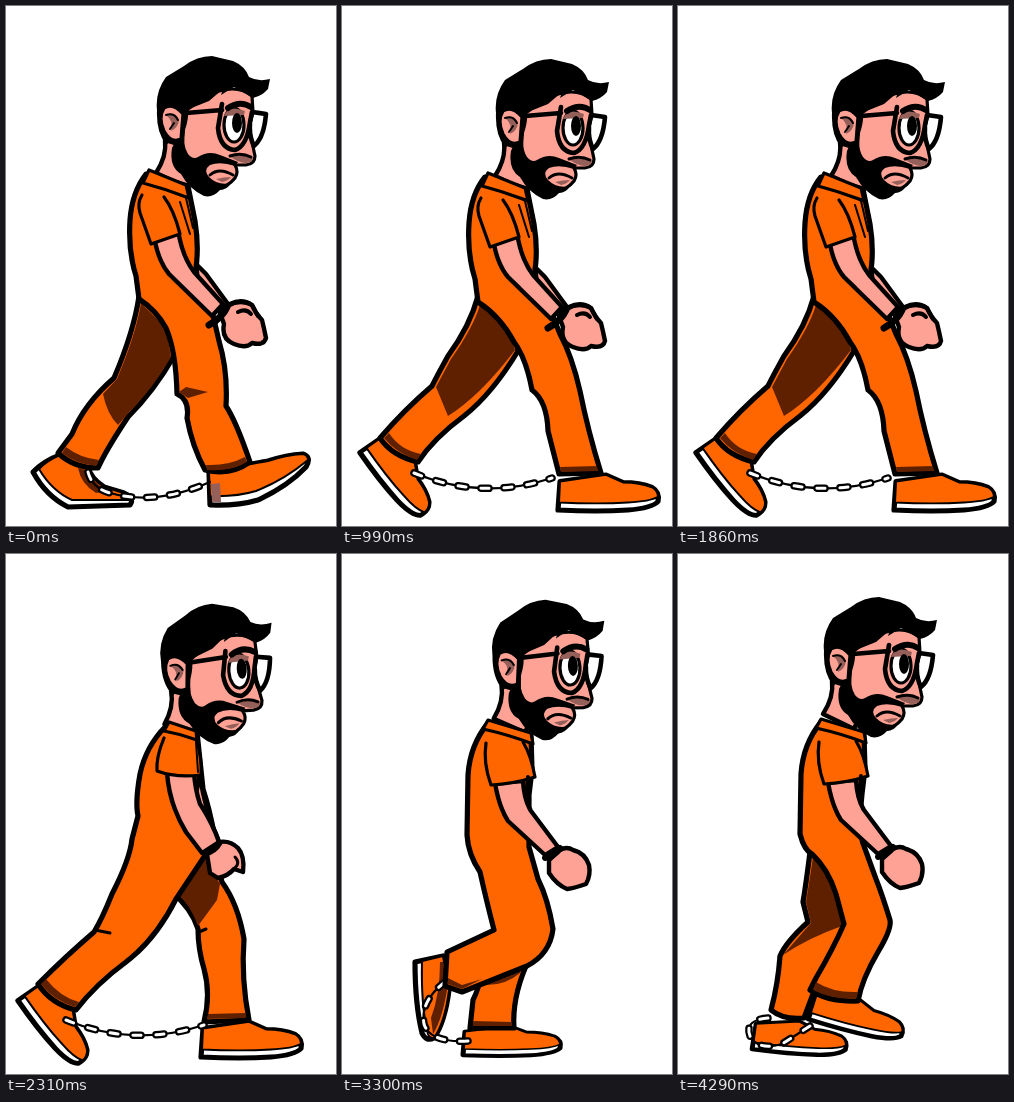
An HTML page without scripts for the animation above (4320 ms loop, 330 by 520 pixels).

```html
<!DOCTYPE html>
<html lang="en">
<head>
<meta charset="utf-8">
<title>Walk cycle</title>
<style>
html, body { margin: 0; width: 100%; height: 100%; overflow: hidden; background: #fff; }
.stage { position: relative; width: 330px; height: 520px; overflow: hidden; }
.reel { position: absolute; left: 0; top: 0; animation: walk 4320ms step-end infinite; }
path, ellipse { stroke-linejoin: round; stroke-linecap: round; }
.o, .s, .w { stroke: #000; stroke-width: 5.2; }
.o { fill: #f60; }
.s { fill: #ffa296; stroke-width: 4.4; }
.w { fill: #fff; }
.d { fill: #5f2000; }
.g { fill: #96605a; }
.l { fill: none; stroke: #000; stroke-width: 3; }
.thin { stroke-width: 3.2; }
.fine { stroke-width: 2; }
.cuff { stroke-width: 7; }
.chain path { fill: none; stroke: #000; stroke-width: 2.2; }
.chain .ring { stroke-width: 7.5; stroke-dasharray: 8 15; }
.chain .hole { stroke: #fff; stroke-width: 3; stroke-dasharray: 8 15; }
/* eight poses every 870 ms, cut short at the end of the loop */
@keyframes walk {
  0%, 20.138%, 40.277%, 60.416%, 80.555% { transform: translateX(0); }
  2.777%, 22.916%, 43.055%, 63.194%, 83.333% { transform: translateX(-330px); }
  5.555%, 25.694%, 45.833%, 65.972%, 86.111% { transform: translateX(-660px); }
  8.333%, 28.472%, 48.611%, 68.749%, 88.888% { transform: translateX(-990px); }
  11.111%, 31.249%, 51.388%, 71.527%, 91.666% { transform: translateX(-1320px); }
  13.194%, 33.333%, 53.472%, 73.611%, 93.749% { transform: translateX(-1650px); }
  15.972%, 36.111%, 56.249%, 76.388%, 96.527% { transform: translateX(-1980px); }
  18.749%, 38.888%, 59.027%, 79.166%, 99.305% { transform: translateX(-2310px); }
}
</style>
</head>
<body>
<div class="stage">
<svg class="reel" width="2640" height="520" viewBox="0 0 2640 520">
<defs>
  <g id="head">
    <path class="s" d="M159 134Q161 150 150 167L181 182L186 170L178 140Z"/>
    <path class="s thin" d="M178 106L200 90Q230 76 246 90L247 106L243 122L249 150Q249 158 240 159L229 159Q233 166 229 172Q222 181 210 183L190 180L176 150Z"/>
    <path d="M160 138Q150 126 151 104Q149 86 160 71L178 60Q191 50 206 50L227 55Q239 60 243 71Q252 76 264 73L262 83Q256 90 247 92L228 81L215 89L217 83L203 95L183 103L178 116L160 140L156 152Z"/>
    <path d="M171 106L182 103Q183 112 179 124Q176 138 182 148Q187 154 192 151Q203 144 214 149L232 156L229 160Q214 155 204 159Q197 164 203 171Q212 180 225 177Q221 184 214 184Q207 192 198 190Q183 183 175 168Q163 161 166 142Q173 130 171 106Z"/>
    <path class="s thin" d="M177 108Q167 96 158 102Q152 112 158 125Q165 138 175 133Z"/>
    <path class="g" d="M160 109Q169 104 173 114Q172 122 165 125Q168 115 160 109Z"/>
    <path class="l fine" d="M160 109Q168 106 172 114M168 117L164 123"/>
    <path class="g" d="M225 151Q236 147 247 152Q247 157 239 157Q231 156 225 151Z"/>
    <path class="l" d="M224 150Q235 146 245 151M204 169Q213 161 227 169"/>
    <path class="g" d="M210 173Q218 171 225 171Q222 175 216 176Z"/>
    <ellipse class="w thin" cx="228" cy="119" rx="10" ry="17"/>
    <path class="g" d="M218 110Q222 98 239 105L238 109Z"/>
    <ellipse cx="231" cy="117" rx="5" ry="10"/>
    <path class="l cuff" d="M222 102Q234 94 245 101" style="stroke-width:6"/>
    <path class="l" d="M180 107L216 104M216 98L212 122Q214 143 229 144Q241 140 244 116L246 106M246 106L260 108Q258 132 248 140Q243 130 244 118" style="stroke-width:4.6"/>
  </g>

  <g id="arms0">
    <path class="s" d="M190 258L200 268L222 298L212 303L192 275Z"/>
    <path class="s" d="M148 230Q152 255 163 268L206 310L217 298L188 266Q176 250 172 224Z"/>
    <path class="s" d="M214 307L224 298Q236 292 246 299Q250 308 256 314Q258 322 260 332Q258 340 246 337Q240 343 228 338Q215 333 218 318Z"/>
    <path class="l cuff" d="M203 319Q216 312 221 301"/>
    <path class="l" d="M222 300Q234 293 246 299L252 310M232 306Q240 302 245 308" style="stroke-width:4"/>
    <path class="o thin" d="M136 189Q131 197 134 207L145 238L174 228Q168 204 158 191"/>
    <path class="l fine" d="M180 192L187 222M174 196L184 228"/>
    <path class="o thin" d="M143 164L180 179L183 192Q160 183 137 177Z"/>
  </g>
  <g id="arms1">
    <path class="s" d="M194 220Q198 255 212 285L204 290L190 240Z"/>
    <path class="s" d="M161 218Q163 250 180 278L196 299L213 288Q206 268 194 250Q189 235 188 218Z"/>
    <path class="s" d="M201 300L213 288Q224 286 232 294Q239 302 237 318L228 315Q222 322 212 324L204 319Z"/>
    <path class="l" d="M228 315Q235 309 229 303"/>
    <path class="l" d="M199 300Q209 298 214 289" style="stroke-width:5"/>
    <path class="o thin" d="M158 184Q150 203 151 217Q170 224 195 221Q196 205 191 188"/>
    <path class="l fine" d="M190 188L192 218"/>
    <path class="o thin" d="M163 168L190 177L191 186Q175 180 158 177Z"/>
  </g>
  <g id="arms2">
    <path class="s" d="M186 258L196 272L214 300L204 304L188 275Z"/>
    <path class="s" d="M151 228Q156 252 165 266L193 309L211 300L188 262Q182 248 180 226Z"/>
    <path class="s" d="M196 312L213 303Q221 297 225 303Q236 306 234 322Q234 334 218 333Q204 333 196 318Z"/>
    <path class="l" d="M194 310L211 303M213 303Q214 297 221 299" style="stroke-width:5"/>
    <path class="o thin" d="M142 190Q139 212 144 232Q165 235 183 228Q184 208 176 190"/>
    <path class="l fine" d="M185 190L189 230M181 196L185 228"/>
    <path class="o thin" d="M149 161L187 175L186 186Q165 178 143 172Z"/>
  </g>
  <g id="arms3">
    <path class="s" d="M150 228Q154 252 163 266L200 300L213 292L186 256Q179 245 178 226Z"/>
    <path class="s" d="M204 305L215 295Q222 291 228 295Q240 298 244 310Q246 320 241 329Q230 333 222 334Q212 330 204 318Z"/>
    <path class="l" d="M200 303Q210 301 215 293" style="stroke-width:6"/>
    <path class="o thin" d="M141 188Q138 208 146 230Q168 229 190 222Q186 200 178 187"/>
    <path class="l" d="M183 222L181 244" style="stroke-width:4"/>
    <path class="o thin" d="M143 165L186 178L188 189Q165 180 138 174Z"/>
  </g>

  <g id="shoe">
    <path class="w" d="M2 -31L0 -1Q40 1 70 -1Q94 -3 100 -10Q102 -20 94 -25Q82 -30 65 -30L48 -38Z"/>
    <path class="o fine" d="M2 -31L1 -9Q40 -7 70 -9Q92 -10 100 -15Q100 -21 94 -25Q82 -30 65 -30L48 -38Z"/>
  </g>
  <g id="bent">
    <path class="w" d="M54 449Q38 455 27 466Q40 490 62 501L124 499Q129 492 118 487L98 481Q84 472 82 460Z"/>
    <path class="o fine" d="M54 449Q40 455 33 463Q46 485 66 494L125 494Q126 490 118 487L98 481Q84 472 82 460Z"/>
    <path class="d" d="M72 462L83 465Q88 478 102 485L90 487Q75 478 72 462Z"/>
  </g>
  <g id="heel">
    <path class="w" d="M203 466L204 499Q232 500 252 494Q282 480 300 461Q306 451 297 448Q280 449 262 455L240 459Z"/>
    <path class="o fine" d="M203 466L204 490Q230 491 250 485Q278 474 302 454Q302 449 297 448Q280 449 262 455L240 459Z"/>
    <path class="g" d="M205 478L214 477L215 496L206 496Z"/>
  </g>
  <g id="raised">
    <path class="w" d="M73 408L101 402L107 436Q103 468 92 484Q84 488 80 479Q73 450 73 408Z"/>
    <path class="o fine" d="M80 407L101 402L107 436Q103 468 92 484Q86 485 85 476Q79 450 80 407Z"/>
    <path class="d" d="M101 408L105 436Q100 466 91 480L89 464Q98 440 98 408Z"/>
  </g>
  <use id="toe" href="#shoe" transform="translate(11 447) rotate(52) scale(.87 1)"/>
  <use id="under" href="#shoe" transform="translate(121 502) scale(.97 .78)"/>
  <use id="swing" href="#shoe" transform="translate(130 466) rotate(15) scale(.94 .85)"/>

  <g id="chain0" class="chain">
    <path d="M82 466Q86 482 104 487Q150 500 204 476"/>
    <path class="ring" d="M82 466Q86 482 104 487Q150 500 204 476"/>
    <path class="hole" d="M82 466Q86 482 104 487Q150 500 204 476"/>
  </g>
  <g id="chain1" class="chain">
    <path d="M60 466Q128 494 198 471"/>
    <path class="ring" d="M60 466Q128 494 198 471"/>
    <path class="hole" d="M60 466Q128 494 198 471"/>
  </g>
  <g id="chain2" class="chain">
    <path d="M103 428Q78 447 82 470Q88 489 126 487"/>
    <path class="ring" d="M103 428Q78 447 82 470Q88 489 126 487"/>
    <path class="hole" d="M103 428Q78 447 82 470Q88 489 126 487"/>
  </g>
  <g id="chain3" class="chain">
    <path d="M90 464Q66 466 72 482Q80 497 104 490L132 472"/>
    <path class="ring" d="M90 464Q66 466 72 482Q80 497 104 490L132 472"/>
    <path class="hole" d="M90 464Q66 466 72 482Q80 497 104 490L132 472"/>
  </g>
</defs>

<!-- near heel reaches out -->
<g>
  <use href="#bent"/>
  <path class="o" d="M133 290Q128 325 108 372Q78 398 66 428L52 447Q68 462 92 462Q100 444 122 411Q148 385 168 350L165 310Z"/>
  <path class="d" d="M135 297Q130 328 111 373L97 388Q101 408 112 419L124 405Q146 384 165 351L160 322Z"/>
  <path class="d" d="M56 447Q70 458 90 460L93 454Q74 452 60 441Z"/>
  <use href="#heel"/>
  <use href="#chain0"/>
  <use href="#head"/>
  <path class="o" d="M140 168Q126 186 124 214Q122 245 130 270L133 293Q150 304 160 322Q170 345 171 388Q184 394 181 412Q186 440 199 464Q225 470 244 456Q230 415 220 400Q222 365 213 335L206 305L190 262Q193 240 189 215L182 180Z"/>
  <path class="d" d="M200 459Q222 460 239 451L241 456Q224 466 201 464Z"/>
  <path class="d" d="M173 386L180 381L202 386L182 392Z"/>
  <use href="#arms0"/>
</g>

<!-- near foot flat -->
<g transform="translate(330)">
  <use href="#toe" transform="translate(6)"/>
  <path class="o" d="M136 290Q128 320 106 350Q96 368 90 380Q62 404 38 432Q50 450 76 456Q92 432 122 410Q150 388 176 345L170 310Z"/>
  <path class="d" d="M138 299Q131 322 109 353L94 381L106 410Q138 390 173 344L166 322Z"/>
  <path class="d" d="M42 432Q54 447 75 454L79 448Q58 444 47 427Z"/>
  <use href="#shoe" transform="translate(216 505) scale(1 .95)"/>
  <use href="#chain1" transform="translate(12 1)"/>
  <use href="#head" transform="translate(3 3)"/>
  <path class="o" d="M143 171Q129 188 127 217Q125 248 133 273L136 296Q158 310 172 336Q184 352 190 384Q205 395 206 425L217 468L259 467Q246 425 238 385Q230 350 218 328L209 306L193 264Q196 243 192 218L185 183Z"/>
  <path class="d" d="M218 461L255 460L256 465L219 466Z"/>
  <use href="#arms0" transform="translate(3 3)"/>
</g>

<!-- near leg straight, far foot lifted -->
<g transform="translate(660)">
  <use href="#raised"/>
  <path class="o" d="M150 376L104 400L104 432L120 438L150 424Z"/>
  <path class="d" d="M106 408Q126 404 148 390L148 423L120 435L106 430Z"/>
  <path class="o" d="M180 300Q200 330 211 363Q213 384 204 390L192 395L165 395L165 310Z"/>
  <path class="d" d="M190 379L209 371Q210 386 186 393Z"/>
  <use href="#under"/>
  <use href="#chain2"/>
  <use href="#head" transform="translate(1 -4) rotate(-1.5 200 120)"/>
  <path class="o" d="M146 167Q132 182 131 208L126 270Q126 298 136 315Q131 355 139 395Q143 422 131 446L128 474L172 474Q170 445 184 412Q196 385 194 372Q189 335 181 306L187 285Q192 250 190 215L186 178Z"/>
  <path class="d" d="M131 467L170 468L170 472L131 472Z"/>
  <use href="#arms2"/>
</g>

<!-- far leg comes forward -->
<g transform="translate(990)">
  <use href="#swing"/>
  <path class="o" d="M150 300L166 370Q155 395 138 424L132 436Q150 448 180 447Q184 425 200 398Q214 375 212 366Q204 340 198 325L186 292Z"/>
  <path class="d" d="M184 300L174 355L160 388Q186 380 209 364L198 330Z"/>
  <path class="d" d="M138 428Q155 439 180 438L178 445Q152 445 135 436Z"/>
  <use href="#shoe" transform="translate(80 500) rotate(3) scale(.93 .85)"/>
  <use href="#chain3" transform="translate(5 2)"/>
  <use href="#head" transform="translate(2 -8) rotate(-1.5 200 120)"/>
  <path class="o" d="M146 164Q132 179 131 205L125 268Q126 298 130 310Q122 345 122 360Q112 390 104 410Q102 435 95 462Q108 470 132 468Q135 440 150 412Q170 385 176 355L186 300L190 215L186 175Z"/>
  <path class="d" d="M99 457Q112 464 131 461L130 466Q110 467 98 461Z"/>
  <use href="#arms2" transform="translate(0 -3)"/>
</g>

<!-- far heel reaches out -->
<g transform="translate(1320)">
  <use href="#heel"/>
  <path class="o" d="M160 310Q170 345 171 388Q184 394 181 412Q186 440 199 464Q225 470 244 456Q230 415 220 400Q222 365 213 335L204 295Z"/>
  <path class="d" d="M178 342L174 385L213 346L206 306Z"/>
  <path class="d" d="M200 459Q222 460 239 451L241 456Q224 466 201 464Z"/>
  <use href="#bent"/>
  <use href="#chain0"/>
  <use href="#head" transform="translate(4 -2) rotate(-3 200 120)"/>
  <path class="o" d="M158 170Q138 190 132 218Q127 246 130 262L126 285Q126 325 108 372Q78 398 66 428L52 447Q68 462 92 462Q100 444 128 408Q160 380 178 340L204 300L206 283Q203 258 195 233L189 176Z"/>
  <path class="d" d="M56 447Q70 458 90 460L93 454Q74 452 60 441Z"/>
  <use href="#arms1" transform="translate(-2 -2)"/>
</g>

<!-- far foot flat -->
<g transform="translate(1650)">
  <use href="#shoe" transform="translate(195 504) scale(1 .95)"/>
  <path class="o" d="M196 295L166 338Q186 355 192 375Q192 395 198 415Q205 440 198 468L243 466Q235 425 238 385Q232 350 216 328L208 300Z"/>
  <path class="d" d="M198 303L170 338Q184 350 192 372L211 346L214 330Z"/>
  <path class="d" d="M202 460L240 459L240 464L201 465Z"/>
  <path class="l" d="M193 378L200 375"/>
  <use href="#toe"/>
  <use href="#chain1"/>
  <use href="#head" transform="translate(5) rotate(-4 200 120)"/>
  <path class="o" d="M160 172Q140 192 134 220Q129 248 132 262L126 285Q124 305 106 340Q96 365 88 378Q60 402 32 430Q45 450 70 456Q90 430 120 408Q150 385 170 345L200 300L209 285Q205 260 197 235L191 178Z"/>
  <path class="d" d="M35 430Q48 447 69 453L73 448Q54 443 40 425Z"/>
  <path class="l" d="M89 376L104 379"/>
  <use href="#arms1"/>
</g>

<!-- far leg straight, near foot lifted -->
<g transform="translate(1980)">
  <use href="#under"/>
  <path class="o" d="M150 380L139 395Q143 422 131 446L128 474L172 474Q170 445 184 412L185 380Z"/>
  <path class="d" d="M147 400L145 431Q164 431 178 419L182 405Z"/>
  <path class="d" d="M131 467L170 468L170 472L131 472Z"/>
  <use href="#raised"/>
  <use href="#chain2"/>
  <use href="#head" transform="translate(0 -4) rotate(-2 200 120)"/>
  <path class="o" d="M146 169Q128 191 126 221L125 281Q126 300 138 318Q144 345 152 376L105 398L103 432L120 438L185 412Q208 400 211 375Q206 345 196 325L187 293L187 241L190 216L189 181Z"/>
  <path class="d" d="M106 424L120 431L140 425L120 435L106 430Z"/>
  <use href="#arms3" transform="translate(3 1)"/>
</g>

<!-- near leg comes forward -->
<g transform="translate(2310)">
  <use href="#shoe" transform="translate(74 496) rotate(5) scale(.93 .85)"/>
  <path class="o" d="M132 298Q128 330 125 348L130 368Q108 388 102 402Q100 430 93 456Q105 466 126 464L135 440L166 372L160 320Z"/>
  <path class="d" d="M135 303Q131 330 128 348L133 369L105 401Q130 384 164 372Q160 340 148 318Z"/>
  <use href="#chain3"/>
  <use href="#swing"/>
  <use href="#head" transform="translate(-5 -7)"/>
  <path class="o" d="M143 168Q125 190 123 220L122 280Q126 296 134 300Q150 315 158 340L166 370Q155 395 138 424L132 436Q150 448 180 447Q184 425 200 398Q214 375 212 366Q204 340 198 325L186 292Q180 280 184 240L187 215L186 180Z"/>
  <path class="d" d="M138 428Q155 439 180 438L178 445Q152 445 135 436Z"/>
  <use href="#arms3"/>
</g>
</svg>
</div>
</body>
</html>
```
